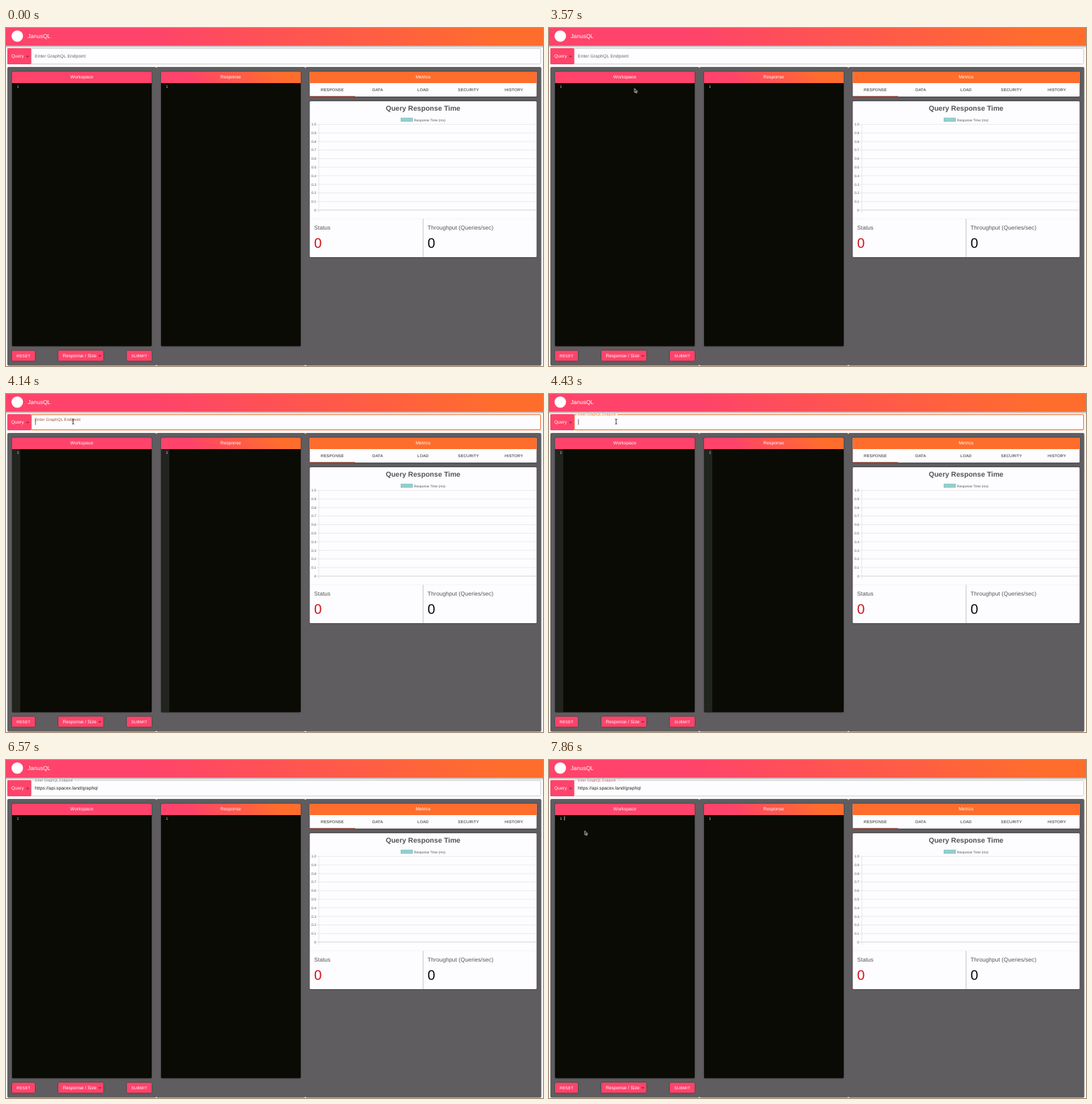
These frames come from a looping animation (800 by 503 pixels, 8000 ms). An HTML page:

```html
<!DOCTYPE html>
<html lang="en">
<head>
<meta charset="utf-8">
<title>JanusQL</title>
<style>
html, body { margin: 0; width: 100%; height: 100%; overflow: hidden; background: #fafafa; }
svg { display: block; width: 800px; height: 503px; }
text { font: 6.78px "Liberation Sans", Arial, sans-serif; letter-spacing: .00938em; text-rendering: geometricPrecision; white-space: pre; }
.mid { text-anchor: middle; }
.end { text-anchor: end; }
.light { fill: #fff; }
.h6 { font-size: 8.48px; letter-spacing: .0075em; }
.btn { font-size: 5.94px; letter-spacing: .02857em; }
.big { font-size: 20.4px; letter-spacing: 0; }
.tick { font-size: 5.09px; letter-spacing: 0; fill: #555; }
.title { font-size: 10.55px; font-weight: bold; letter-spacing: 0; fill: #555; }
.num { font: 5px "DejaVu Sans Mono", monospace; fill: #e8e8e2; }
.raise { filter: drop-shadow(0 .8px .8px rgba(0,0,0,.45)); }

/* Everything changes in hard steps on one 8 s clock. */
.anim { animation: 8s step-end infinite; }
#arrow { animation-name: arrow; }
#beam { animation-name: beam; opacity: 0; }
#label { animation-name: label; }
#focus { animation-name: focus; opacity: 0; }
#gutters { animation-name: gutters; opacity: 0; }
#notch, #url { animation-name: filled; opacity: 0; }
#notch { animation-name: notch; }
#caret { animation-name: caret; opacity: 0; }
#editCaret { animation-name: edit; opacity: 0; }

@keyframes arrow {
  0% { opacity: 0; transform: translate(127.4px, 90px); }
  44.6% { opacity: 1; transform: translate(127.4px, 90px); }
  46.3% { opacity: 1; transform: translate(115px, 69px); }
  48.2% { opacity: 0; }
  91.1% { opacity: 1; transform: translate(140px, 128px); }
  92.8% { opacity: 1; transform: translate(109px, 121px); }
  94.6% { opacity: 1; transform: translate(84.7px, 113.2px); }
  96.4% { opacity: 1; transform: translate(61px, 107px); }
  98.2%, 100% { opacity: 1; transform: translate(53.3px, 105.4px); }
}
@keyframes beam {
  0% { opacity: 0; }
  48.2% { opacity: 1; transform: translate(103px, 47px); }
  49.9% { opacity: 1; transform: translate(100px, 41px); }
  57.1%, 100% { opacity: 0; }
}
@keyframes label {
  0% { transform: translate(43px, 44.3px); fill: #666; }
  51.7% { transform: translate(43px, 39.5px) scale(.9); fill: #9c5440; }
  53.6% { transform: translate(43px, 32.1px) scale(.75); fill: #ff6d2d; }
  64.2% { transform: translate(43px, 32.1px) scale(.75); fill: #6d6666; }
  66.1% { transform: translate(43px, 32.1px) scale(.75); fill: #666; }
  98.2%, 100% { transform: translate(43px, 32.1px) scale(.75); fill: #b0505a; }
}
@keyframes focus { 0% { opacity: 0; } 51.7% { opacity: 1; } 64.2%, 100% { opacity: 0; } }
@keyframes gutters { 0% { opacity: 0; } 51.7% { opacity: 1; } 57.1%, 100% { opacity: 0; } }
@keyframes notch { 0% { opacity: 0; } 53.6%, 100% { opacity: 1; } }
@keyframes filled { 0% { opacity: 0; } 57.1%, 100% { opacity: 1; } }
@keyframes caret {
  0% { opacity: 0; }
  51.7% { opacity: 1; transform: translate(43.4px, 0); }
  57.1% { opacity: 1; transform: translate(138px, 0); }
  62.4%, 100% { opacity: 0; }
}
@keyframes edit { 0% { opacity: 0; } 98.2%, 100% { opacity: 1; } }
</style>
</head>
<body>
<svg viewBox="0 0 800 503" xmlns="http://www.w3.org/2000/svg">
  <defs>
    <linearGradient id="top" gradientUnits="userSpaceOnUse" x1="0" x2="800" y1="0" y2="0" gradientTransform="skewX(45)">
      <stop offset=".25" stop-color="#ff436a"/><stop offset=".9" stop-color="#ff6d2d"/>
    </linearGradient>
    <linearGradient id="bar" gradientUnits="userSpaceOnUse" x1="231" x2="439" y1="0" y2="0" gradientTransform="translate(-73 0) skewX(45)">
      <stop offset=".2" stop-color="#ff436a"/><stop offset=".85" stop-color="#ff6d2d"/>
    </linearGradient>
    <linearGradient id="shade" x2="0" y2="1">
      <stop stop-color="#000" stop-opacity=".32"/><stop offset="1" stop-color="#000" stop-opacity="0"/>
    </linearGradient>
  </defs>

  <rect width="800" height="503" fill="#fafafa"/>
  <rect y="26" width="800" height="4" fill="url(#shade)"/>
  <rect width="800" height="26.3" fill="url(#top)"/>
  <circle cx="16.8" cy="12" r="8.6" fill="#fff"/>
  <text class="h6 light" x="32.3" y="15.3">JanusQL</text>

  <!-- endpoint row -->
  <rect x="37.5" y="30.5" width="759" height="23" rx="1.7" fill="#fdfcfe" stroke="#c6c4c7" stroke-width=".8"/>
  <rect id="focus" class="anim" x="37.8" y="30.7" width="758.6" height="22.7" rx="1.7" fill="none" stroke="#ff6d2d" stroke-width="1.1"/>
  <rect id="notch" class="anim" x="41" y="29.6" width="61" height="2" fill="#fcfbfd"/>
  <rect x="2" y="30" width="35.5" height="24" rx="1" fill="#ff436a"/>
  <text class="light" x="8" y="44.3">Query</text>
  <path d="M30 41.5h4.4l-2.2 2.2z" fill="#7c2c42"/>
  <g id="label" class="anim" fill="#666" style="transform:translate(43px,44.3px)"><text>Enter GraphQL Endpoint</text></g>
  <text id="url" class="anim" x="43" y="44.3" fill="#222">https://api.spacex.land/graphql</text>
  <rect id="caret" class="anim" y="37.5" width=".7" height="8.4" fill="#222"/>

  <!-- panels -->
  <g fill="#605d60">
    <rect x="2" y="58" width="222" height="444.5" rx="2"/>
    <rect x="224" y="58" width="222" height="444.5" rx="2"/>
    <rect x="446" y="58" width="351.5" height="444.5" rx="2"/>
  </g>
  <g class="raise">
    <rect x="9" y="65" width="208" height="408.5" rx="1.5" fill="#0a0b05"/>
    <rect x="231" y="65" width="208" height="408.5" rx="1.5" fill="#0a0b05"/>
  </g>
  <path d="M9 82V66.5q0-1.5 1.5-1.5h205q1.5 0 1.5 1.5V82z" fill="#ff436a"/>
  <path d="M231 82V66.5q0-1.5 1.5-1.5h205q1.5 0 1.5 1.5V82z" fill="url(#bar)"/>
  <g id="gutters" class="anim" fill="#222420">
    <rect x="9" y="82" width="12.3" height="391"/>
    <rect x="231" y="82" width="12.3" height="391"/>
  </g>
  <text class="num" x="16.2" y="88.7">1</text>
  <text class="num" x="238.2" y="88.7">1</text>
  <rect id="editCaret" class="anim" x="22.7" y="83.6" width=".8" height="6.4" fill="#ddd"/>
  <text class="light mid" x="113" y="75.4">Workspace</text>
  <text class="light mid" x="334.7" y="75.4">Response</text>

  <g class="raise" fill="#ff436a">
    <rect x="9" y="480.3" width="34" height="15" rx="1.5"/>
    <rect x="78" y="480" width="67" height="15.2" rx="1.5"/>
    <rect x="180" y="480.3" width="37" height="15" rx="1.5"/>
  </g>
  <text class="btn light mid" x="26" y="490">RESET</text>
  <text class="light" x="84.7" y="489.7">Response / Size</text>
  <path d="M137.5 487h4.6l-2.3 2.3z" fill="#7c2c42"/>
  <text class="btn light mid" x="198.6" y="490">SUBMIT</text>

  <!-- metrics -->
  <g class="raise">
    <rect x="452.5" y="65" width="338" height="37" rx="1.5" fill="#fdfcfe"/>
    <rect x="452.5" y="109" width="338" height="232" rx="1.5" fill="#fdfcfe"/>
  </g>
  <path d="M452.5 82V66.5q0-1.5 1.5-1.5h335q1.5 0 1.5 1.5V82z" fill="#ff6d2d"/>
  <text class="light mid" x="621.3" y="75.4">Metrics</text>
  <g id="tabs" fill="#222"></g>
  <rect x="452.5" y="101.2" width="67.5" height=".9" fill="#c4513c"/>
  <text class="title mid" x="621.3" y="122.8">Query Response Time</text>
  <rect x="588.4" y="134" width="17.2" height="5" fill="#93cfcf" stroke="#78bcbc" stroke-width=".8"/>
  <text class="tick" x="607.8" y="138.5">Response Time (ms)</text>
  <g id="grid"></g>
  <path d="M466 143.3V275" stroke="#dcdbdd" stroke-width=".7"/>
  <path d="M453 283.8H790" stroke="#ecebed" stroke-width=".6"/>
  <path d="M621.3 284V341" stroke="#bdbbbe" stroke-width=".9"/>
  <text class="h6" x="459" y="300.3" fill="#555">Status</text>
  <text class="h6" x="628" y="300.3" fill="#555">Throughput (Queries/sec)</text>
  <text class="big" x="459" y="326.8" fill="#cf1018">0</text>
  <text class="big" x="628" y="326.8" fill="#080808">0</text>

  <!-- pointers -->
  <g id="beam" class="anim" fill="none">
    <path d="M-1.6-3.8Q0-3.8 0-2.8Q0-3.8 1.6-3.8M0-2.8V2.8M-1.6 3.8Q0 3.8 0 2.8Q0 3.8 1.6 3.8" stroke="#222" stroke-width=".9"/>
  </g>
  <path id="arrow" class="anim" d="M0 0V6L1.4 4.8L2.4 7L3.4 6.5L2.5 4.4H4.3Z" fill="#111" stroke="#eee" stroke-width=".8" style="opacity:0"/>
</svg>
<script>
const byId = id => document.getElementById(id);

byId('tabs').innerHTML = ['RESPONSE', 'DATA', 'LOAD', 'SECURITY', 'HISTORY']
  .map((name, i) => `<text class="btn mid" x="${486.2 + i * 67.6}" y="94.1">${name}</text>`).join('');

byId('grid').innerHTML = Array.from({ length: 11 }, (_, i) => {
  const y = 143.4 + i * 12.76;
  const value = i < 10 ? (1 - i / 10).toFixed(1) : '0';
  return `<path d="M463 ${y}H789.5" stroke="${i < 10 ? '#e3e2e4' : '#bfbec0'}" stroke-width=".7"/>
    <text class="tick end" x="462" y="${y + 1.8}">${value}</text>`;
}).join('');
</script>
</body>
</html>
```
